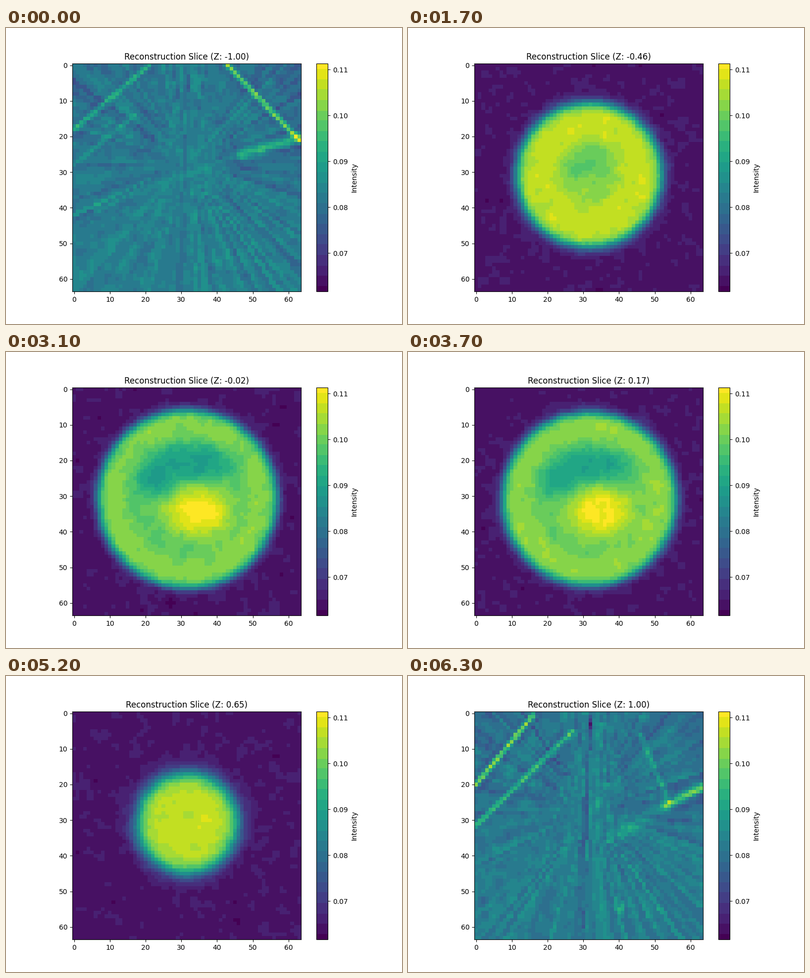
Write a matplotlib script that moves like this. It is 800 px wide and 600 px high and loops after 6400 ms.

```python
import numpy as np
import matplotlib.pyplot as plt
from matplotlib.animation import FuncAnimation
from matplotlib.colors import ListedColormap

N = 64
LO, HI = 0.06166, 0.11134
LEVELS = 23
DEPTHS = np.linspace(-1, 1, N)

rng = np.random.default_rng(7)
Y, X = np.mgrid[0:N, 0:N].astype(float)
RADIUS = np.hypot(X - 31.7, Y - 30.8)
SIDE = 31.5 - abs(X - 31.5)  # distance from the nearer side


def sigmoid(v):
    return 1 / (1 + np.exp(-np.clip(v, -50, 50)))


def ease(v):
    v = np.clip(v, 0, 1)
    return v * v * (3 - 2 * v)


def blob(cx, cy, sx, sy, power=1, x=X):
    return np.exp(-(((x - cx) / sx) ** 2 + ((Y - cy) / sy) ** 2) ** power)


def beam(x0, y0, x1, y1, strength, width=.75):
    """Bright line with a faint dark halo."""
    dx, dy = x1 - x0, y1 - y0
    t = ((X - x0) * dx + (Y - y0) * dy) / (dx * dx + dy * dy)
    t = np.clip(t, 0, 1)
    dist = np.hypot(X - x0 - t * dx, Y - y0 - t * dy) / width
    return strength * (np.exp(-dist ** 2) - .2 * np.exp(-(dist / 3) ** 2))


def smooth(a, axes):
    for ax in axes:
        a = (np.roll(a, 1, ax) + 2 * a + np.roll(a, -1, ax)) / 4
    return a / a.std()


# Beams that show in the lowest, the highest and the near-polar slices
LOW = (beam(43, 0, 63, 21, .5) + beam(64, 20, 47, 25, .3, 1.4)
       + beam(47, 25, 6, 40, .08, 1.2)
       + beam(21, 0, 0, 18, .27) + beam(17, 14, 0, 28, .15))
HIGH = (beam(16, .5, 0, 20, .55) + beam(27, 5, 0, 31.5, .35)
        + beam(64, 20.5, 53, 26, .45, 1.2) + beam(53, 26, 40, 34, .14, 2)
        + beam(46, 6, 54, 25, .2))
POLAR = (beam(34, 26, 40, 18, .3, 2.2) + beam(40, 18, 52, 6, .35, 1.1)
         + beam(48, 20, 56, 14, .35))

GRAIN = smooth(rng.normal(size=(N, N, N)), (0, 1, 2))
SPOKES = smooth(rng.normal(size=(N, 180)), (0, 0))
PLUME = smooth(rng.normal(size=(N, 200)), (0,))

ANGLE = np.arctan2(Y - 27, X - 32) / (2 * np.pi) + .5
SPOKE_ID = (ANGLE * 180).astype(int) % 180
REACH = np.clip(np.hypot(X - 32, Y - 27) / 14, 0, 1)
SLOPE = (X - 33) / (Y + 14)
PLUME_ID = np.clip(SLOPE / .02 + 100, 0, 199).astype(int)
PLUME_FADE = np.exp(-(SLOPE / .25) ** 2) / (1 + Y / 35)
SHADE = .1 * blob(0, 0, 11, 13, x=SIDE) + .06 * blob(21, 18, 4, 9, x=SIDE)


def body(z):
    """Soft sphere with a hollow, a dark crescent and a bright core."""
    rad = 32 * np.sqrt(.06 * np.log1p(np.exp((.615 - z * z) / .06)))
    width = .8 * min(24 / rad, 2)
    mask = sigmoid((rad - RADIUS) / width) / sigmoid(rad / width)

    raw = .985 + .03 * np.clip(RADIUS / rad, 0, 1) ** 2
    hollow = 32 * np.sqrt(max(.28 - z * z, 0))
    k = hollow / 15.6
    if k > 0:
        raw -= .1 * min(1, hollow / 4) * sigmoid((hollow - RADIUS) / 1.2)
        arc = np.maximum(
            blob(32, 31 - 9.5 * k, 12 * k, 5.5, 1.5),
            blob(32 - 8 * k, 31 - 6 * k, 6 * k, 5.5, 1.5))
        raw -= .21 * k ** 1.5 * arc
    core = max(1 - ((z - .05) / .42) ** 2, 0)
    if core > 0:
        size = np.sqrt(core)
        raw += .37 * core * blob(34.7, 34.3, 9.6 * size, 7.6 * size, 1.4)
    return mask * raw


def artifacts(i, z, polar):
    """Grain and spokes everywhere, plume and beams near the poles."""
    end = ease((abs(z) - .88) / .12)
    field = (.013 + .008 * polar) * GRAIN[i]
    field += (.003 + .032 * polar) * REACH * SPOKES[i][SPOKE_ID]
    plume = PLUME[i][PLUME_ID] * (.8 + .4 * GRAIN[i])
    field += end * PLUME_FADE * ((.08 + .02 * z) * plume + .05)
    field += end * ((LOW if z < 0 else HIGH) - SHADE)
    return field + polar * np.exp(-((abs(z) - .82) / .08) ** 2) * POLAR


def slice_at(i):
    z = DEPTHS[i]
    polar = np.clip((abs(z) - .68) / .32, 0, 1)
    base = .055 + .36 * polar ** 1.4
    shape = body(z)
    peak = max(shape.max(), 1.1 - .08 * polar)
    gain = ease((1 - abs(z)) / .13)
    field = base + gain * (1 - base) * shape / peak + artifacts(i, z, polar)
    return LO + (HI - LO) * np.clip(field, 0, 1)


steps = np.round(np.linspace(0, 1, 256) * (LEVELS - 1)) / (LEVELS - 1)
cmap = ListedColormap(plt.get_cmap("viridis")(steps))

fig, ax = plt.subplots(figsize=(8, 6), dpi=100)
im = ax.imshow(slice_at(0), cmap=cmap, vmin=LO, vmax=HI)
fig.colorbar(im, ax=ax, label="Intensity")
title = ax.set_title("")


def update(i):
    im.set_data(slice_at(i))
    title.set_text(f"Reconstruction Slice (Z: {DEPTHS[i]:.2f})")
    return im, title


anim = FuncAnimation(fig, update, frames=N, interval=100, repeat=True, repeat_delay=0)
plt.show()
```
